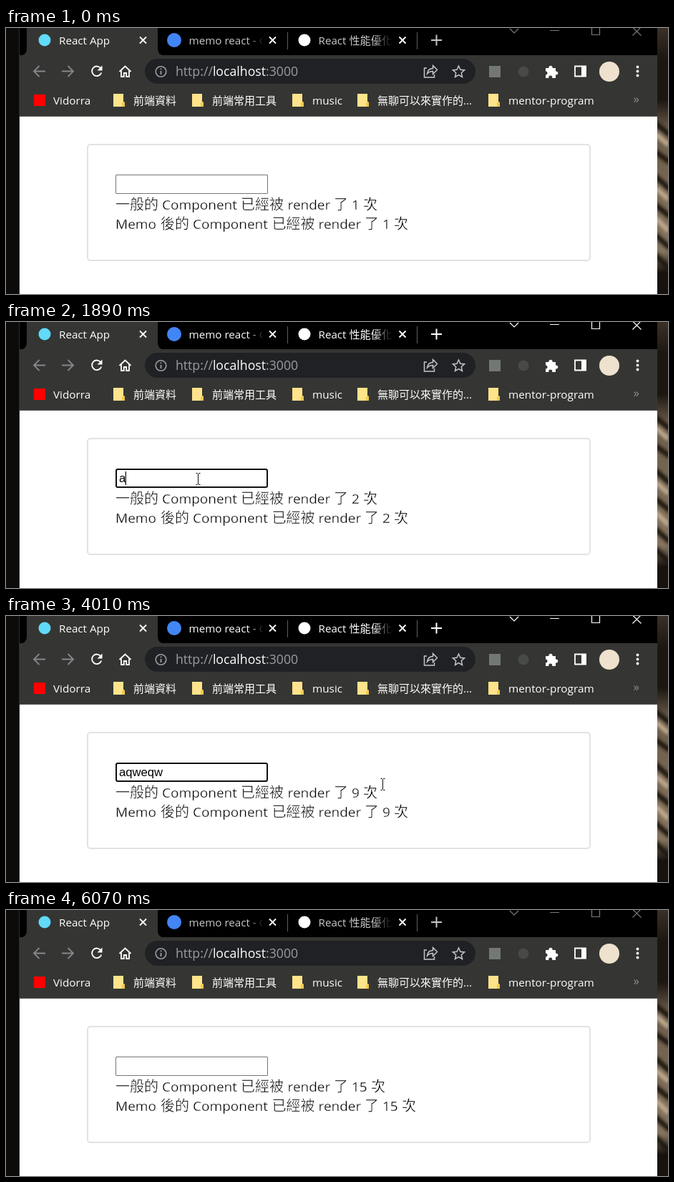
Recreate the animation shown at these times as an HTML page. Size 925x372 px, loop 6140 ms.

```html
<!DOCTYPE html>
<html lang="zh-Hant">
<head>
<meta charset="utf-8">
<title>React App</title>
<style>
  html, body { margin: 0; width: 100%; height: 100%; overflow: hidden; background: #0c0b0a; }
  svg { display: block; width: 925px; height: 372px; }
  text { font-family: "Open Sans", "Noto Sans CJK TC", "Noto Sans CJK", sans-serif; white-space: pre; }
  .ui { font-size: 15px; fill: #fff; }
  .latin { font-size: 15.3px; }
  .tab { font-size: 15.2px; }
  .url { font-size: 17.7px; fill: #9a9da1; }
  /* the white outline thins the strokes */
  .page { font-size: 19px; fill: #000; stroke: #fff; stroke-width: .3; }
  .page .zh { font-size: 20px; font-weight: 300; stroke-width: .5; font-family: "Noto Sans CJK TC", "Noto Sans CJK", sans-serif; }
  .field { font: 16.67px "Liberation Sans", Arial, sans-serif; fill: #000; }
  .line { fill: none; stroke: #fff; stroke-width: 1.8; }
  .dim { stroke: #85878a; }
</style>
</head>
<body>
<svg viewBox="0 0 925 372">
  <defs>
    <linearGradient id="fade"><stop offset="0" stop-color="#000" stop-opacity="0"/><stop offset="1" stop-color="#000"/></linearGradient>
    <linearGradient id="photo" x2="0" y2="1">
      <stop offset="0" stop-color="#3a3027"/><stop offset=".12" stop-color="#1c1611"/>
      <stop offset=".27" stop-color="#1c1611"/><stop offset=".38" stop-color="#6b5b49"/>
      <stop offset=".84" stop-color="#85735d"/><stop offset=".92" stop-color="#17120e"/>
    </linearGradient>
    <filter id="soft" x="-50%" y="-50%" width="200%" height="200%"><feGaussianBlur stdDeviation="2"/></filter>
    <clipPath id="side"><rect x="910" width="15" height="372"/></clipPath>
    <g id="folder">
      <path d="M0 0h14v11l2 1v6H0z" fill="#ffe48c"/>
      <path d="M14 11l2 1v6h-4v-5z" fill="#f3c94f"/>
    </g>
    <path id="cross" d="M-4.5-4.5l9 9m0-9l-9 9" class="line"/>
  </defs>

  <!-- desktop behind the window -->
  <rect width="925" height="372" fill="#0c0b0a"/>
  <g clip-path="url(#side)">
    <rect x="910" width="15" height="372" fill="url(#photo)"/>
    <g filter="url(#soft)" fill="none" stroke="#1c1611" stroke-width="7">
      <path d="M906 132l22 18M906 172l22 16M906 206l22 20M906 246l22 18M906 288l22 20M906 316l22 22"/>
      <path d="M908 148l18 16M908 224l18 16M908 266l18 18" stroke="#bfa98d"/>
    </g>
  </g>

  <!-- browser frame -->
  <rect x="19" width="891" height="372" fill="#fff"/>
  <rect x="19" width="891" height="40" fill="#000"/>
  <rect x="19" y="38" width="891" height="86" fill="#353633"/>
  <rect x="19" y="123" width="891" height="1" fill="#5a5b59"/>
  <path d="M19 38.500q10 0 10-10V0h183v28.500q0 10 10 10z" fill="#353633"/>
  <path d="M18.500 0V372" stroke="#2b2b2a"/>

  <!-- tabs -->
  <circle id="favicon" cx="54" cy="17" r="8.500" fill="#61dafb"/>
  <circle cx="235" cy="17" r="10" fill="#4285f4"/>
  <circle cx="417" cy="17" r="8.500" fill="#fff"/>
  <text class="tab" x="74" y="23" fill="#fff">React App</text>
  <g id="others">
    <text class="tab" x="255.500" y="23">memo react - G</text>
    <text class="tab" x="436.500" y="23">React 性能優化</text>
  </g>
  <rect x="338" y="4" width="22" height="28" fill="url(#fade)"/>
  <rect x="360" y="4" width="7" height="28"/>
  <rect x="512" y="4" width="28" height="28" fill="url(#fade)"/>
  <rect x="540" y="4" width="8" height="28"/>
  <use href="#cross" x="191.500" y="17"/>
  <use href="#cross" x="372.500" y="17"/>
  <use href="#cross" x="554" y="17"/>
  <path d="M393.500 6v24M574.500 6v24" stroke="#5c5e61"/>
  <path id="plus" fill="none" stroke-width="2" d="M594 17h15M601.500 9.500v15"/>
  <path id="controls" fill="none" stroke-width="1.200" d="M704 1l6 6 6-6M760 3.500h13M818.500-2h11v11.500h-11zM875.500-1l12 11.500m0-12l-12 12"/>

  <!-- toolbar -->
  <path class="line dim" d="M55 60.500H39m7.500-7.500l-7.500 7.500 7.500 7.500M78 60.500h16m-7.500-7.500l7.500 7.500-7.500 7.500"/>
  <g id="reload">
    <path class="line" stroke-width="2" d="M132.500 56.500a6.800 6.800 0 1 0 .8 6"/>
    <path d="M134.500 52.500v7h-7z" fill="#fff"/>
  </g>
  <path id="stop" class="line" d="M120 54l13 13m0-13l-13 13"/>
  <path class="line" d="M158.500 61l8-7.500 8 7.500M161 59.500V68h3.800v-5h3.400v5h3.800v-8.500"/>
  <rect x="194" y="43" width="462" height="35" rx="17.500" fill="#202124"/>
  <circle cx="216.500" cy="61" r="7.300" fill="none" stroke="#9a9da1" stroke-width="1.600"/>
  <path d="M216.500 60v5M216.500 56.500v1.800" stroke="#9a9da1" stroke-width="1.800"/>
  <text class="url" x="237" y="67">http://<tspan fill="#fff">localhost</tspan>:3000</text>
  <g fill="none" stroke="#c4c6c8" stroke-width="1.500">
    <path d="M588 56h-3.500v13h14v-4M588.500 64q1-7.500 8-7.500v-4l6 6-6 6v-4q-5 0-8 3.500z"/>
    <path d="M632.500 53l2.400 5.300 5.700.6-4.300 3.900 1.200 5.700-5-2.900-5 2.900 1.200-5.700-4.300-3.900 5.700-.6z"/>
  </g>
  <rect x="675" y="53" width="16" height="16" fill="#747875"/>
  <circle cx="723" cy="61" r="7.500" fill="#484a48"/>
  <path d="M754 56h4.500a2.600 2.600 0 1 1 5 0h4.500v4.500a2.600 2.600 0 1 1 0 5V70h-5a2.500 2.500 0 1 0-4.500 0H754v-4.500a2.500 2.500 0 1 0 0-5z" fill="#fff"/>
  <path d="M795 53.500h15v14h-15z" class="line" stroke-width="2"/>
  <path d="M804 53h7v15h-7z" fill="#fff"/>
  <circle cx="843" cy="61" r="14" fill="#eee1cd"/>
  <g fill="#fff"><circle cx="882.500" cy="54.500" r="1.900"/><circle cx="882.500" cy="60.500" r="1.900"/><circle cx="882.500" cy="66.500" r="1.900"/></g>

  <!-- bookmarks -->
  <rect x="39" y="93" width="16" height="16" fill="#f00"/>
  <use href="#folder" x="150" y="92"/><use href="#folder" x="260" y="92"/>
  <use href="#folder" x="400" y="92"/><use href="#folder" x="491" y="92"/>
  <use href="#folder" x="674" y="92"/>
  <text class="ui latin" x="66" y="107">Vidorra</text>
  <text class="ui" x="178" y="107">前端資料</text>
  <text class="ui" x="288" y="107">前端常用工具</text>
  <text class="ui latin" x="428" y="107">music</text>
  <text class="ui" x="519" y="107">無聊可以來實作的...</text>
  <text class="ui latin" x="702" y="107">mentor-program</text>
  <text class="ui" x="876.500" y="105" style="fill:#8b8d8a;font-size:17px">»</text>

  <!-- page -->
  <rect x="114" y="163" width="702" height="162" rx="4" fill="none" stroke="#e2e2e2" stroke-width="2"/>
  <rect id="box" fill="#fff"/>
  <text id="value" class="field" x="158" y="224"></text>
  <path id="caret" stroke="#000" stroke-width="1.200"/>
  <text class="page" y="253.500"><tspan class="zh" x="153">一般的</tspan><tspan x="218">Component</tspan><tspan class="zh" x="328">已經被</tspan><tspan x="393.500">render</tspan><tspan class="zh" x="458">了</tspan><tspan x="483" id="n1"></tspan><tspan class="zh" id="u1">次</tspan></text>
  <text class="page" y="280.500"><tspan x="153">Memo</tspan><tspan class="zh" x="216">後的</tspan><tspan x="261">Component</tspan><tspan class="zh" x="371.500">已經被</tspan><tspan x="436.500">render</tspan><tspan class="zh" x="501">了</tspan><tspan x="526" id="n2"></tspan><tspan class="zh" id="u2">次</tspan></text>

  <!-- pointers -->
  <path id="arrow" d="M0 0v15l3.500-3.300 2.600 6 2.400-1-2.600-5.900h4.600z" fill="#000" stroke="#fff" stroke-width=".7"/>
  <path id="beam" d="M-2.500-7.500h2l1 1 1-1h2M-2.500 8.500h2l1-1 1 1h2M.5-6.500v14" fill="none" stroke="#111"/>
</svg>
<script>
const LOOP = 6140;
const $ = id => document.getElementById(id);
const set = (id, attrs) => { for (const k in attrs) $(id).setAttribute(k, attrs[k]); };
const show = (id, on) => set(id, { visibility: on ? 'visible' : 'hidden' });

// [time, field text, render count]
const typing = [
  [0, '', 1], [1890, 'a', 2], [2220, 'aq', 3], [2550, 'aqw', 4], [2720, 'aqwe', 5],
  [2920, 'aqweq', 6], [3090, 'aqweqw', 7], [3540, 'aqweqwe', 8], [3610, 'aqweqw', 9],
  [4040, 'aqweq', 10], [4070, 'aqwe', 11], [4110, 'aqw', 12],
  [4140, 'aq', 13], [4160, 'a', 14], [4180, '', 15]
];
// [time, caret visible]
const blinks = [[0, 0], [1380, 1], [4010, 0], [4040, 1], [4670, 0], [5190, 1], [5640, 0]];
// [time, x, y] of the pointer
const path = [
  [90, 905, 374], [210, 770, 300], [360, 610, 230], [450, 540, 216], [510, 540, 216],
  [700, 318, 238], [840, 282, 225], [1020, 270, 220], [1170, 268, 219], [2190, 268, 219],
  [2310, 350, 214], [2430, 445, 217], [2610, 505, 226], [2820, 526, 235], [4890, 526, 235],
  [5040, 462, 262], [5220, 377, 285], [5310, 500, 300], [5490, 832, 340], [5640, 850, 374]
];

const at = (table, t) => table.filter(r => r[0] <= t).pop();

function pointer(t) {
  const i = path.findIndex(p => p[0] > t);
  if (i <= 0) return [-50, -50];
  const a = path[i - 1], b = path[i];
  const k = (t - a[0]) / (b[0] - a[0]);
  return [a[1] + (b[1] - a[1]) * k, a[2] + (b[2] - a[2]) * k];
}

function draw(t) {
  const [, text, count] = at(typing, t);
  const focus = t >= 1380 && t < 6070;
  const active = t >= 200 && t < 6070;
  const loading = t >= 400 && t < 660;

  show('favicon', !loading);
  show('reload', !loading);
  show('stop', loading);
  set('controls', { stroke: active ? '#fff' : '#77797c' });
  set('plus', { stroke: active ? '#fff' : '#c4c6c8' });
  set('others', { fill: active ? '#fff' : '#c8c8c8' });

  const [x, y] = pointer(Math.floor(t / 30) * 30);
  const overField = x >= 153 && x < 366 && y >= 205 && y < 232;
  const overText = x >= 153 && x < 575 && y >= 232 && y < 288;
  const isBeam = overField || overText;
  const place = { transform: `translate(${Math.round(x)} ${Math.round(y)})` };
  set('arrow', place);
  set('beam', place);
  show('arrow', !isBeam);
  show('beam', isBeam);

  set('box', focus
    ? { x: 154, y: 206, width: 211, height: 25, rx: 2, stroke: '#101010', 'stroke-width': 2 }
    : { x: 153.5, y: 205.5, width: 212, height: 26, rx: 0.5,
        stroke: overField ? '#4f4f4f' : '#767676', 'stroke-width': 1 });

  $('value').textContent = text;
  const end = 158.5 + (text ? $('value').getComputedTextLength() - 0.5 : 0);
  set('caret', { d: `M${end} 209v19` });
  show('caret', focus && at(blinks, t)[1]);

  const wide = count > 9 ? 11 : 0;
  $('n1').textContent = $('n2').textContent = count;
  set('u1', { x: 499 + wide });
  set('u2', { x: 542 + wide });
}

const start = performance.now();
function tick() {
  draw((performance.now() - start) % LOOP);
  requestAnimationFrame(tick);
}
tick();
</script>
</body>
</html>
```
